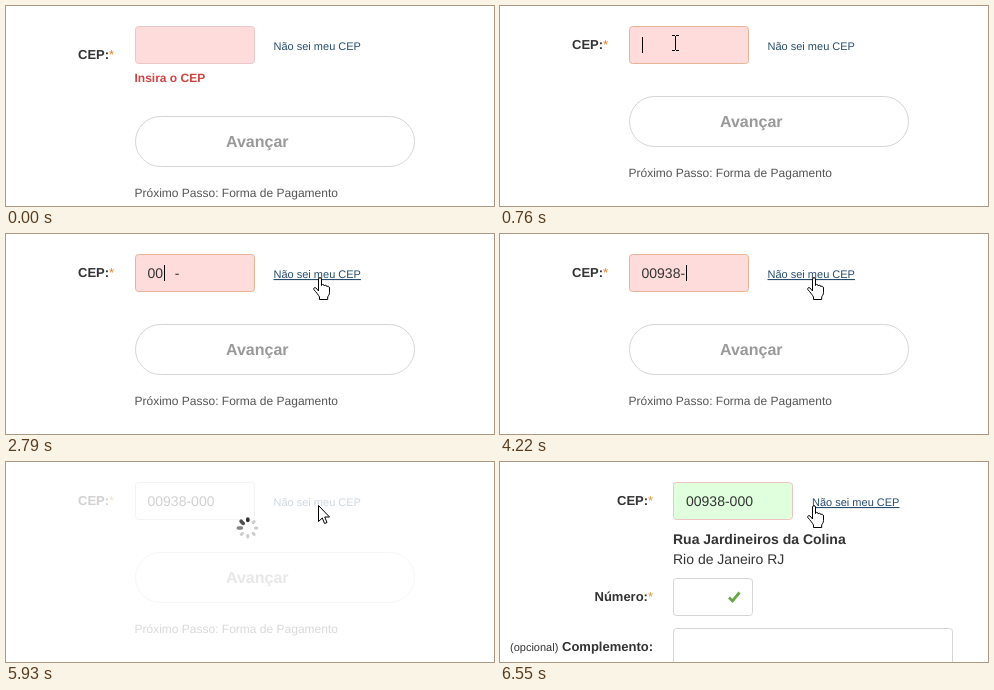
These frames come from a looping animation (488 by 200 pixels, 8 s). An HTML page:

```html
<!DOCTYPE html>
<html lang="pt-BR">
<head>
<meta charset="utf-8">
<title>CEP</title>
<style>
  html, body { margin: 0; width: 100%; height: 100%; overflow: hidden; background: #fff; }
  svg { display: block; width: 488px; height: 200px; }
  text { font: 12px "Liberation Sans", Arial, sans-serif; fill: #333; white-space: pre; text-rendering: geometricPrecision; }
  rect { fill: #fff; stroke: #d5d5d5; }
  .label { font-size: 13px; font-weight: bold; }
  .star { font-weight: normal; fill: #f47a20; }
  .link { font-size: 11px; fill: #264c6e; }
  .link.hover { text-decoration: underline; }
  .value { font-size: 14px; }
  .cursor { fill: #fff; stroke: #000; stroke-linejoin: round; }
</style>
</head>
<body>
<svg viewBox="0 0 488 200">
  <g id="form">
    <text id="label" class="label" x="72">CEP:<tspan class="star">*</tspan></text>
    <rect id="field" x="129.5" y="20.5" width="119" height="37" rx="3"/>
    <text id="typed" class="value" x="141.5" y="44"></text>
    <path id="caret" stroke="#000"/>
    <text id="link" class="link" x="267.5" y="44">Não sei meu CEP</text>
    <text id="error" x="128.5" y="76" font-weight="bold" style="font-weight:bold;fill:#cf4340">Insira o CEP</text>
    <g id="next">
      <rect x="129.5" y="90.5" width="279" height="50" rx="25"/>
      <text x="220" y="121" style="font-size:16px;font-weight:bold;fill:#999">Avançar</text>
      <text x="128.5" y="171" style="fill:#555">Próximo Passo: Forma de Pagamento</text>
    </g>
  </g>

  <g id="spinner" transform="translate(241.8 66)" stroke-linecap="round"></g>

  <g id="address">
    <text class="label" x="117" y="43">CEP:<tspan class="star" style="fill:#d9953c">*</tspan></text>
    <rect x="173.5" y="20.5" width="119" height="37" rx="3" style="fill:#dfffdd;stroke:#efc4c0"/>
    <text id="found" class="value" x="186" y="44"></text>
    <text class="link hover" x="312" y="44">Não sei meu CEP</text>
    <text class="value" x="173" y="82" style="font-weight:bold">Rua Jardineiros da Colina</text>
    <text class="value" x="173" y="102">Rio de Janeiro RJ</text>
    <text class="label" x="94.5" y="139">Número:<tspan class="star" style="fill:#d9953c">*</tspan></text>
    <rect x="173.5" y="116.5" width="79" height="37" rx="3"/>
    <path d="M229 135.5l3.5 3.5L239.500 130.500" fill="none" stroke="#67a745" stroke-width="2.8"/>
    <text x="10" y="189" style="font-size:11px">(opcional)</text>
    <text class="label" x="62" y="189">Complemento:</text>
    <rect x="173.5" y="166.5" width="279" height="60" rx="3"/>
  </g>

  <path id="arrow" class="cursor" d="M.5 .5V16.500L4.300 13L6.600 18.500L9 17.500L6.700 12H11.500Z"/>
  <path id="beam" fill="none" stroke="#000" d="M0 .5H3M4 .5H7M3.500 1V15M0 15.500H3M4 15.500H7"/>
  <path id="hand" class="cursor" d="M5.500 14V2C5.500 .2 8.500 .2 8.500 2V8.500C8.500 7 11.300 7 11.300 9C11.300 7.800 14 8 14 9.800C14 8.800 16.500 9 16.500 11V15.500C16.500 18 15 19 14.700 20V22.500H6.500V20C5.500 18 3 15 .8 12.500C.2 11 1.800 10 3 11Z"/>
</svg>
<script>
const el = id => document.getElementById(id);
const show = (id, on) => el(id).style.display = on ? "" : "none";
const CODE = "00938-000", LOOP = 8000, FOCUS = 760, LOADING = 5930, DONE = 6550;

// time, digits typed, caret visible
const typing = [
  [0, 0, 0], [FOCUS, 0, 1], [1390, 0, 0], [1860, 1, 1], [2330, 1, 0], [2790, 2, 1],
  [3110, 3, 1], [3580, 3, 0], [3900, 4, 1], [4220, 5, 1], [4680, 6, 1], [5290, 6, 0],
  [5460, 7, 1], [5760, 8, 1], [LOADING, 8, 0]
];
// time, cursor shape, left, top
const pointer = [
  [0, "none", 0, 0], [290, "arrow", 219, 88], [460, "beam", 181, 41], [610, "beam", 172, 29],
  [930, "hand", 302, 44], [1080, "hand", 307, 43], [LOADING, "arrow", 312, 43], [DONE, "hand", 307, 43]
];
const stateAt = (keys, t) => keys.findLast(key => key[0] <= t);

const masked = n => !n ? "" : n < 5
  ? CODE.slice(0, n).padEnd(5) + "-"
  : CODE.slice(0, n + 1);

el("found").textContent = CODE;
const spokes = Array.from({ length: 8 }, (_, i) => {
  const spoke = document.createElementNS("http://www.w3.org/2000/svg", "path");
  spoke.setAttribute("transform", `rotate(${i * 45})`);
  return el("spinner").appendChild(spoke);
});

function drawSpinner(t) {
  const head = 6 + [6080, 6230, 6400].filter(step => t >= step).length;
  spokes.forEach((spoke, i) => {
    const age = (head - i + 8) % 8;
    spoke.setAttribute("d", age && age < 3 ? "M6.500 0H9.500" : "M7.500 0H9");
    spoke.setAttribute("stroke", ["#333", "#505050", "#858585"][age] || "#cdcdcd");
    spoke.setAttribute("stroke-width", age < 3 ? 3.6 : 3);
  });
}

function draw(t) {
  const focused = t >= FOCUS, loading = t >= LOADING && t < DONE;
  show("form", t < DONE);
  show("address", t >= DONE);
  show("spinner", loading);
  show("error", !focused);
  el("form").setAttribute("opacity", loading ? 0.22 : 1);
  el("label").setAttribute("y", focused ? 43 : 53);
  el("next").setAttribute("transform", `translate(0 ${focused ? 0 : 20})`);
  el("field").style.fill = loading ? "#fff" : "#ffdcdc";
  el("field").style.stroke = loading ? "#ccc" : focused ? "#e9b396" : "#ecc6c8";

  const [, count, caretOn] = stateAt(typing, t);
  el("typed").textContent = masked(count);
  const caretX = Math.round(142 + 7.785 * count + (count >= 5 ? 4.66 : 0));
  el("caret").setAttribute("d", `M${caretX + 0.5} 31V47`);
  show("caret", caretOn);

  const [, shape, x, y] = stateAt(pointer, t);
  for (const id of ["arrow", "beam", "hand"]) {
    show(id, id === shape);
    el(id).setAttribute("transform", `translate(${x} ${y})`);
  }
  el("link").classList.toggle("hover", shape === "hand");
  drawSpinner(t);
}

const start = performance.now();
function tick() {
  draw((performance.now() - start) % LOOP);
  requestAnimationFrame(tick);
}
tick();
</script>
</body>
</html>
```
